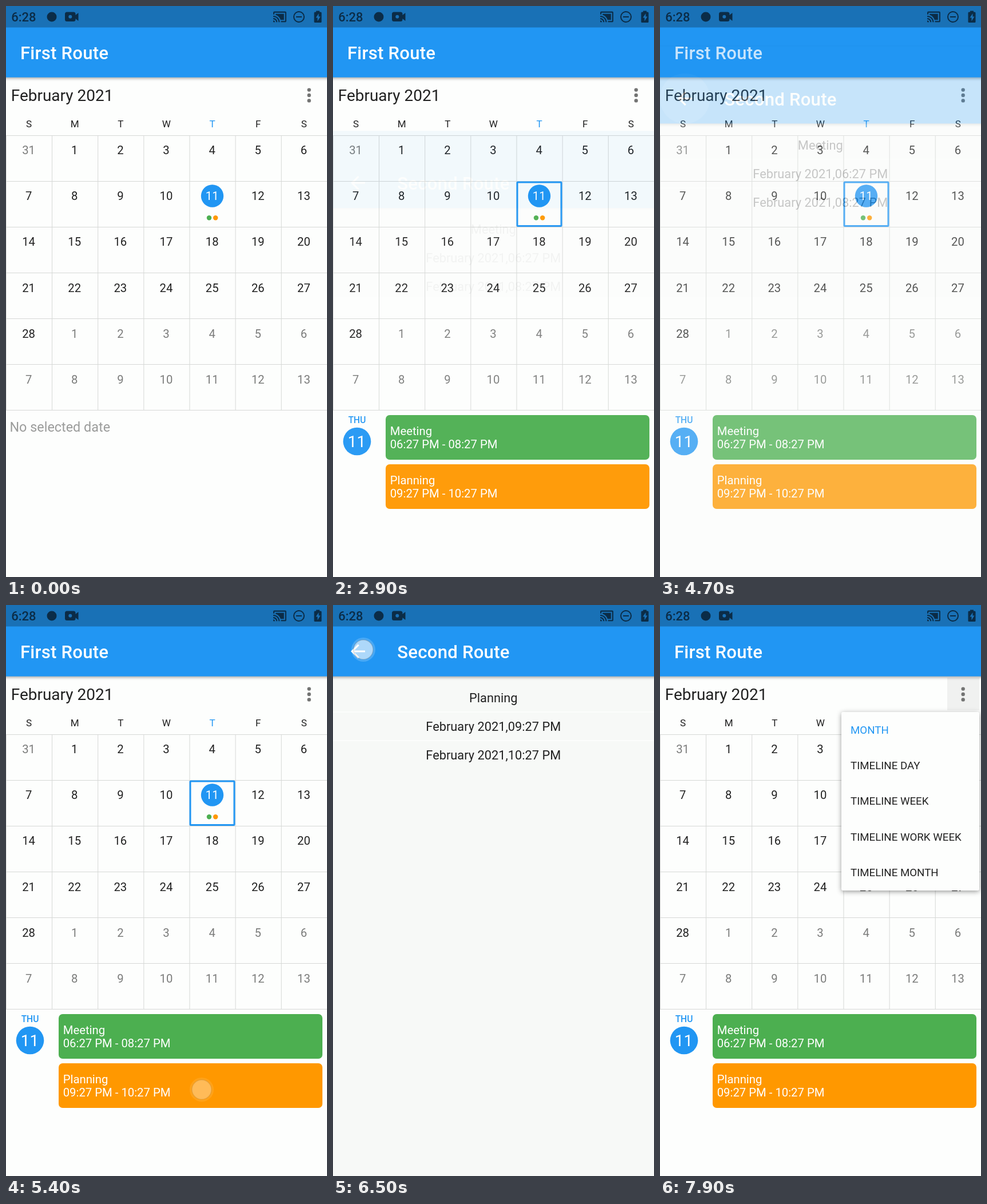
Animation of 561 by 998 pixels, one loop 8 s. Source, as an HTML page:

```html
<!DOCTYPE html>
<html lang="en">
<meta charset="utf-8">
<title>Calendar routes</title>
<style>
html, body { margin: 0; width: 100%; height: 100%; overflow: hidden; background: #fdfefd; }
svg { display: block; width: 561px; height: 998px; font-family: Roboto, sans-serif; }
.bar { fill: #2196f3; filter: drop-shadow(0 2px 2.5px rgba(0, 0, 0, .35)); }
.title { font-size: 31.2px; font-weight: 500; letter-spacing: .2px; fill: #fff; }
#popup { filter: drop-shadow(0 2px 4px rgba(0, 0, 0, .4)); }
</style>
<svg id="stage" viewBox="0 0 561 998"></svg>
<script>
const BLUE = '#2196f3', INK = '#212121', GREY = '#7b7c7b', DARK = '#0b2c47', WHITE = '#fdfefd';
const LOOP = 8000, STEP = 100, ROUTE_MS = 300;

const text = (x, y, size, fill, str, extra = '') =>
  `<text x="${x}" y="${y}" font-size="${size}" fill="${fill}" ${extra}>${str}</text>`;
const middle = (x, y, size, fill, str, extra = '') =>
  text(x, y, size, fill, str, 'text-anchor="middle" ' + extra);
const rect = (x, y, w, h, fill, extra = '') =>
  `<rect x="${x}" y="${y}" width="${w}" height="${h}" fill="${fill}" ${extra}/>`;
const circle = (x, y, r, fill, extra = '') =>
  `<circle cx="${x}" cy="${y}" r="${r}" fill="${fill}" ${extra}/>`;
const group = (id, ...parts) => `<g id="${id}">${parts.join('')}</g>`;
const appBar = (x, title) =>
  rect(-10, -10, 581, 134.7, BLUE, 'class="bar"') + `<text class="title" x="${x}" y="93">${title}</text>`;

const CELL = 80.14, GRID_TOP = 226.5;

function monthGrid() {
  let out = '';
  for (let i = 0; i < 7; i++) {
    const x = 40 + i * CELL, line = i * CELL + .4, y = GRID_TOP + i * 80;
    out += middle(x, 212, 17.1, i === 4 ? BLUE : INK, 'SMTWTFS'[i]);
    out += rect(line - .5, GRID_TOP, 1, 480, '#d6d8d6') + rect(0, y - .5, 561, 1, '#d6d8d6');
  }
  out += circle(360.5, 332, 19.7, BLUE) + circle(355, 370.3, 4.2, '#4caf50') + circle(366.2, 370.3, 4.2, '#ff9800');
  for (let i = 0; i < 42; i++) {
    const inMonth = i > 0 && i < 29;
    const day = i === 0 ? 31 : (i - 1) % 28 + 1;
    const fill = i === 11 ? '#fff' : inMonth ? INK : GREY;
    out += middle(39.6 + i % 7 * CELL, 259.2 + Math.floor(i / 7) * CELL, 20.3, fill, day);
  }
  return out;
}

const card = (y, fill, name, hours) =>
  rect(92, y, 461, 78, fill, 'rx="7"') +
  text(99.7, y + 34.5, 20.3, '#fff', name) + text(99.7, y + 57.7, 20.3, '#fff', hours);

const firstRoute = group('first',
  rect(0, 0, 561, 998, WHITE),
  rect(502, 127, 56, 57, '#f0f1f0', 'id="pressed"'),
  text(8.7, 166, 28, INK, 'February 2021'),
  [-9.4, 0, 9.4].map(d => circle(529.7, 156 + d, 3.2, '#737473')).join(''),
  monthGrid(),
  text(6.4, 744.3, 23.4, '#9b9c9b', 'No selected date', 'id="empty"'),
  group('agenda',
    rect(322, 308, 77, 76.5, 'none', `stroke="${BLUE}" stroke-width="3" rx="1"`),
    middle(42, 728.7, 15.6, BLUE, 'THU', 'font-weight="500"'),
    circle(42, 761, 24.3, BLUE), middle(41.5, 771, 28, '#fff', '11'),
    card(715, '#4caf50', 'Meeting', '06:27 PM - 08:27 PM'),
    card(801, '#ff9800', 'Planning', '09:27 PM - 10:27 PM')),
  appBar(25, 'First Route'));

const VIEWS = ['MONTH', 'TIMELINE DAY', 'TIMELINE WEEK', 'TIMELINE WORK WEEK', 'TIMELINE MONTH'];
const popup = group('popup',
  rect(317, 187, 241, 312, WHITE, 'rx="3" id="sheet"'),
  group('views', ...VIEWS.map((v, i) => text(333, 224.6 + i * 62.4, 18.7, i ? INK : BLUE, v))));

const secondRoute = group('second',
  rect(0, 0, 561, 998, '#f7f9f7'),
  rect(0, 186, 561, 2, '#fcfdfc'), rect(0, 236, 561, 2, '#fcfdfc'),
  [170, 220, 270].map(y => middle(280.3, y, 21.8, INK, '', 'class="detail"')).join(''),
  appBar(112.2, 'Second Route'),
  circle(43.6, 81, 44, '#fff', 'id="splash" opacity=".12"'),
  '<path transform="translate(24.9 62.3) scale(1.558)" fill="#fff" d="M20 11H7.83l5.59-5.59L12 4l-8 8 8 8 1.41-1.41L7.83 13H20z"/>');

const statusBar = group('status',
  rect(0, 0, 561, 37.5, 'rgba(0,0,0,.25)'),
  text(9.2, 27, 22, DARK, '6:28', 'font-weight="500"'),
  circle(80, 19, 8.5, DARK),
  rect(103, 10.5, 18.5, 16.5, DARK, 'rx="3.5"'),
  `<path d="M120 17l6.5-5v14l-6.5-5z" fill="${DARK}"/>`,
  circle(112.3, 18.8, 3, '#1970b6'),
  `<path transform="translate(466 6.5) scale(1.04)" fill="${DARK}" d="M1 18v3h3c0-1.66-1.34-3-3-3zm0-4v2c2.76 0 5 2.24 5 5h2c0-3.87-3.13-7-7-7zm18-7H5v1.63c3.96 1.28 7.09 4.41 8.37 8.37H19zM1 10v2c4.97 0 9 4.03 9 9h2c0-6.08-4.93-11-11-11zm20-7H3c-1.1 0-2 .9-2 2v3h2V5h18v14h-7v2h7c1.1 0 2-.9 2-2V5c0-1.1-.9-2-2-2z"/>`,
  circle(512, 19, 9, 'none', `stroke="${DARK}" stroke-width="2"`),
  rect(507, 18, 10, 2, DARK),
  rect(538.5, 10.5, 13, 18.5, DARK, 'rx="1.5"'), rect(542, 8.5, 6, 3, DARK),
  '<path d="M546.5 13l-5 7.5h3v6l5-8h-3z" fill="#1970b6"/>');

const touch = group('touch',
  circle(0, 0, 21, '#fff', 'opacity=".18"'),
  circle(0, 0, 17, '#fff', 'fill-opacity=".55" stroke="#777" stroke-opacity=".3" stroke-width="1.5"'));

const stage = document.getElementById('stage');
stage.innerHTML = firstRoute + popup + secondRoute + statusBar + touch;
const $ = id => document.getElementById(id);
const details = [...document.querySelectorAll('.detail')];

const clamp = v => Math.min(1, Math.max(0, v));
const ramp = (t, start, length) => clamp((t - start) / length);
const show = (id, on) => $(id).setAttribute('visibility', on ? 'visible' : 'hidden');

function bezier(x1, y1, x2, y2) {
  const at = (a, b, s) => 3 * a * s * (1 - s) ** 2 + 3 * b * s * s * (1 - s) + s ** 3;
  return x => {
    let lo = 0, hi = 1;
    for (let i = 0; i < 20; i++) {
      const mid = (lo + hi) / 2;
      if (at(x1, x2, mid) < x) lo = mid; else hi = mid;
    }
    return at(y1, y2, (lo + hi) / 2);
  };
}
const fastOutSlowIn = bezier(.4, 0, .2, 1), easeIn = bezier(.42, 0, 1, 1);

// Each tap: start, end, x, y; it is faint in its last step.
const TAPS = [
  [700, 1100, 360, 350], [2500, 2900, 345, 757], [4300, 4600, 53, 78],
  [5300, 5500, 342, 847], [6500, 6700, 53, 78], [7400, 7700, 530, 156]
];
const EVENTS = [['Meeting', '06:27 PM', '08:27 PM'], ['Planning', '09:27 PM', '10:27 PM']];

function draw(t) {
  show('empty', t < 1500);
  show('agenda', t >= 1500);

  const route = start => ramp(t, start, ROUTE_MS);
  const open = route(2850) - route(4530) + route(5430) - route(6630);
  show('second', open > 0);
  $('second').setAttribute('opacity', easeIn(open));
  $('second').setAttribute('transform', `translate(0 ${(1 - fastOutSlowIn(open)) * 249.5})`);
  const [name, from, to] = EVENTS[t < 5100 ? 0 : 1];
  [name, 'February 2021,' + from, 'February 2021,' + to].forEach((s, i) => details[i].textContent = s);
  $('splash').setAttribute('opacity', t >= 4400 && t < 5000 || t >= 6600 && t < 7000 ? .12 : 0);

  const menu = ramp(t, 7550, 250);
  show('pressed', t >= 7500);
  show('popup', menu > 0);
  $('popup').setAttribute('opacity', menu);
  $('sheet').setAttribute('height', 312 * fastOutSlowIn(menu));
  $('views').setAttribute('opacity', ramp(menu, .4, .6));

  const tap = TAPS.find(([start, end]) => t >= start && t < end);
  show('touch', tap);
  if (tap) {
    $('touch').setAttribute('transform', `translate(${tap[2]} ${tap[3]})`);
    $('touch').setAttribute('opacity', t < tap[1] - STEP ? 1 : .55);
  }
}

function tick() {
  draw(Math.floor(performance.now() % LOOP / STEP) * STEP);
  requestAnimationFrame(tick);
}
tick();
</script>
</html>
```
